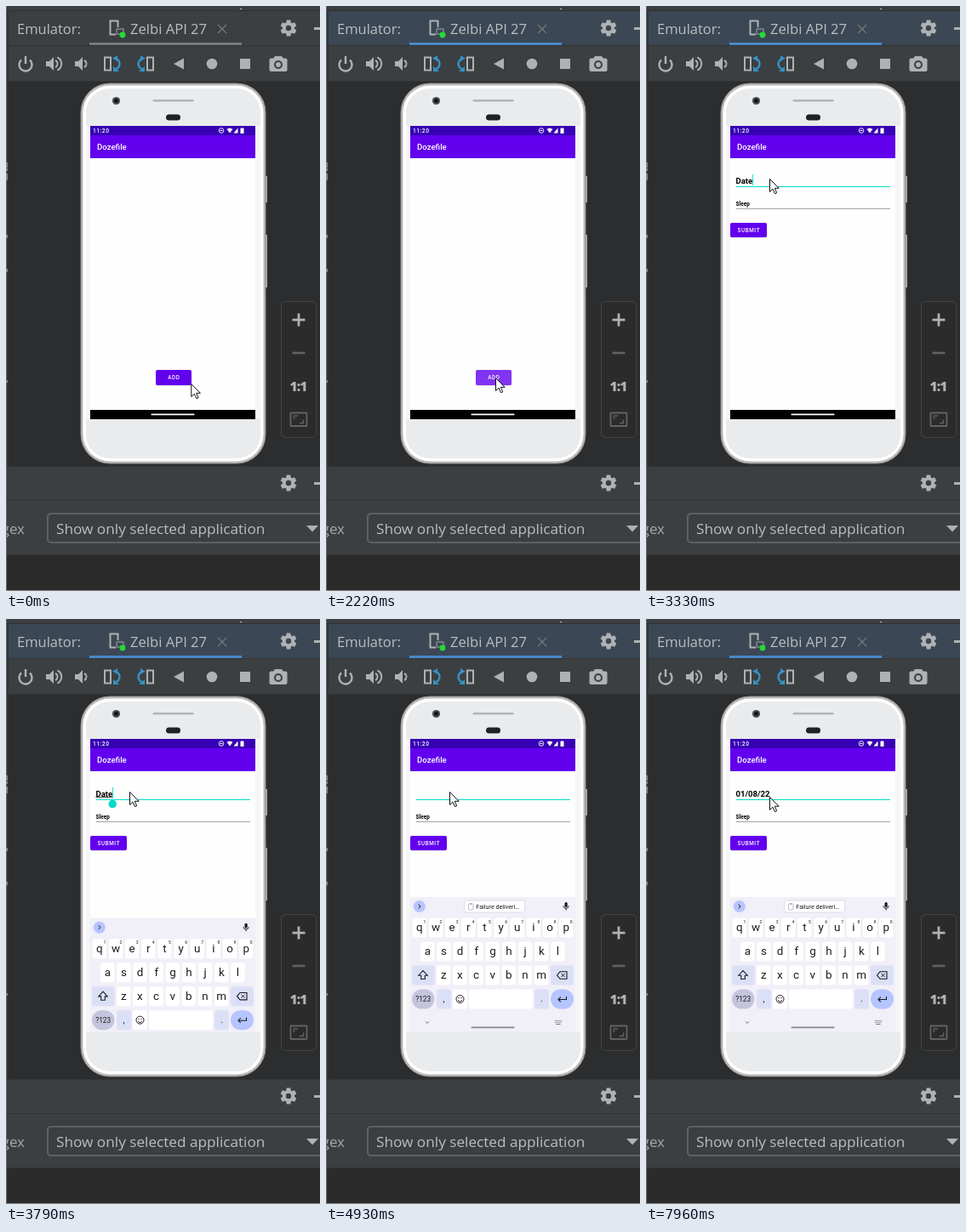
Write an HTML page with a canvas that moves like this. It is 369 px wide and 688 px high and loops after 7990 ms.

```html
<!DOCTYPE html>
<html lang="en">
<head>
<meta charset="utf-8">
<title>Emulator demo</title>
<style>
html, body { margin: 0; width: 100%; height: 100%; overflow: hidden; background: #2b2b2b; }
canvas { display: block; width: 369px; height: 688px; }
</style>
</head>
<body>
<canvas id="stage"></canvas>
<script>
const W = 369, H = 688, LOOP = 7990;
const canvas = document.getElementById('stage');
const c = canvas.getContext('2d');
const dpr = window.devicePixelRatio || 1;
canvas.width = W * dpr;
canvas.height = H * dpr;

const ICON = '#afb1b3', DIM = '#606366', BLUE = '#3592c4';
const PURPLE = '#6200ee', TEAL = '#03dac5', INK = '#1b1b1f';
const UI = '"Open Sans", sans-serif', APP = 'Roboto, sans-serif';

const clamp = v => Math.max(0, Math.min(1, v));
const span = (t, a, b) => clamp((t - a) / (b - a));
const mix = (a, b, p) => a + (b - a) * p;
const smooth = p => p * p * (3 - 2 * p);
const easeOut = p => 1 - (1 - p) ** 3;

function rect(x, y, w, h, color) {
  c.fillStyle = color;
  c.fillRect(x, y, w, h);
}
function rounded(x, y, w, h, r, fill, stroke, width = 1) {
  c.beginPath();
  c.roundRect(x, y, w, h, r);
  if (fill) { c.fillStyle = fill; c.fill(); }
  if (stroke) { c.strokeStyle = stroke; c.lineWidth = width; c.stroke(); }
}
function disc(x, y, r, fill) {
  c.beginPath();
  c.arc(x, y, r, 0, Math.PI * 2);
  c.fillStyle = fill;
  c.fill();
}
function arc(x, y, r, a, b, color, width) {
  c.beginPath();
  c.arc(x, y, r, a, b);
  c.strokeStyle = color;
  c.lineWidth = width;
  c.stroke();
}
function trace(points, closed) {
  c.beginPath();
  for (let i = 0; i < points.length; i += 2) c.lineTo(points[i], points[i + 1]);
  if (closed) c.closePath();
}
function poly(points, fill) {
  trace(points, true);
  c.fillStyle = fill;
  c.fill();
}
function line(points, color, width = 1, closed = false) {
  trace(points, closed);
  c.strokeStyle = color;
  c.lineWidth = width;
  c.stroke();
}
function text(s, x, y, font, color, align = 'left', spacing = 0) {
  c.font = font;
  c.fillStyle = color;
  c.textAlign = align;
  c.letterSpacing = spacing + 'px';
  c.fillText(s, x, y);
  c.letterSpacing = '0px';
}
function at(x, y, draw) {
  c.save();
  c.translate(x, y);
  draw();
  c.restore();
}

// IDE window

function gear(x, y) {
  at(x, y, () => {
    for (let i = 0; i < 6; i++) {
      c.rotate(Math.PI / 3);
      poly([-2.2, -9.5, 2.2, -9.5, 3.2, -5, -3.2, -5], ICON);
    }
    arc(0, 0, 5.1, 0, 7, ICON, 3.8);
  });
  rect(362, y - 1, 7, 3, ICON);
}
function speaker(x, waves) {
  poly([x, 65, x + 4, 65, x + 9, 60, x + 9, 76, x + 4, 71, x, 71], ICON);
  arc(x + 9, 68, 4.5, -1.1, 1.1, ICON, 2);
  if (waves > 1) arc(x + 10, 68, 8.3, -1.15, 1.15, ICON, 2);
}
function rotateIcon(x, dir) {
  at(x, 68, () => {
    c.scale(dir, 1);
    line([-9, -7.5, -2, -7.5, -2, 7.5, -9, 7.5], ICON, 2, true);
    arc(2, 0, 6.5, -1.3, 1.25, BLUE, 2.4);
    poly([0, -6.5, 6, -10, 6, -3], BLUE);
    poly([1, 3, 8, 9, 1, 9], BLUE);
  });
}
function toolbar() {
  arc(23, 69, 7.5, -0.85, Math.PI + 0.85, ICON, 2.4);
  rect(21.8, 59, 2.4, 9, ICON);
  speaker(47, 2);
  speaker(81, 1);
  rotateIcon(125, 1);
  rotateIcon(164, -1);
  poly([197, 68, 209, 61.5, 209, 74.5], ICON);
  disc(242, 68, 6.3, ICON);
  rect(275, 62, 12, 12, ICON);
  rounded(309.5, 61.5, 21, 15.5, 2, ICON);
  poly([314, 62, 316, 59, 324, 59, 326, 62], ICON);
  disc(320, 69, 5, '#3c3f41');
  disc(320, 69, 3, ICON);
}
function zoomPanel() {
  rounded(323.5, 347.5, 41, 160, 5, '#2b2b2b', '#434648');
  rect(336.5, 367.7, 15, 2.8, ICON);
  rect(342.6, 361.6, 2.8, 15, ICON);
  rect(336.5, 406.7, 15, 2.6, DIM);
  text('1:1', 343.5, 452.6, '800 15.4px ' + UI, ICON, 'center', -0.8);
  rounded(334.5, 478.5, 19, 15.5, 0.5, null, DIM, 1.8);
  line([338.5, 486, 338.5, 482, 343, 482], DIM, 1.4);
  line([349.5, 486.5, 349.5, 490.5, 345, 490.5], DIM, 1.4);
}
function ide(active) {
  rect(0, 0, W, H, '#2b2d2e');
  rect(0, 0, W, 88, '#3c3f41');
  rect(0, 5, W, 1, '#2f3133');
  rect(275, 3, 2, 1, '#c8c8c8');
  rect(3, 6, W, 40, active ? '#3b4754' : '#3c3f41');
  rect(3, 46, W, 1, '#323436');
  rect(0, 88, W, 1, '#323436');
  rect(1, 6, 2, 535, '#313335');

  text('Emulator:', 13, 33, '16.5px ' + UI, '#bbbdbf');
  line([132, 17.5, 122.5, 17.5, 122.5, 33.5, 129, 33.5], ICON, 2);
  line([131.5, 17, 131.5, 25], ICON, 2);
  rounded(130, 27, 8, 6, 0.5, null, '#7f8b93', 1.5);
  disc(137, 34, 3.4, '#22dd32');
  text('Zelbi API 27', 146, 33, '16.6px ' + UI, '#bbbdbf');
  line([249, 22, 259, 32], '#73787b', 1.3);
  line([259, 22, 249, 32], '#73787b', 1.3);
  rect(98, 43, 179, 3, active ? '#4a88c7' : '#747a80');
  gear(332, 26);
  toolbar();
  zoomPanel();

  rect(0, 541, W, 104, '#3c3f41');
  rect(0, 541, W, 1, '#323436');
  rect(0, 581, W, 1, '#323436');
  rect(0, 645, W, 1, '#323436');
  rect(0, 646, W, 42, '#2b2b2b');
  gear(332, 561);
  text('gex', 22, 621, '17px ' + UI, '#a6a9ab', 'right');
  rounded(49, 597, 340, 34, 4, '#3c3f41', '#5e6164', 2);
  text('Show only selected application', 59, 621, '17.2px ' + UI, '#bbbdbf');
  poly([353, 611, 367, 611, 360, 618.5], ICON);

  rect(0, 0, 1, H, '#66686a');
  rect(0, H - 1, W, 1, '#85878a');
  [[184, 6], [191, 3], [197, 8], [269, 4], [309, 4], [440, 3]]
    .forEach(([y, h]) => rect(0, y, 2, h, '#85888a'));
}

// Phone

function phoneBody() {
  rect(303, 200, 4, 31, '#aeb0b2');
  rect(303, 269, 4, 62, '#aeb0b2');
  rounded(88, 91, 217, 447, 34, '#bdbabb', '#8f8d8e', 1);
  rounded(90.5, 93.5, 212, 442, 31.5, '#fff');
  rounded(94, 97, 205, 435, 28, '#e9ebed');
  rect(94, 141, 5, 345, '#f5f6f7');
  rect(293, 141, 6, 345, '#f5f6f7');
  disc(129.5, 111.5, 4.6, '#4a4c4e');
  disc(129.5, 111.5, 2.4, '#111315');
  rounded(172.5, 110, 48, 2.5, 1.2, '#b2b4b6');
  rounded(188, 127.5, 17, 7, 3.5, '#202224');
}
function statusBar() {
  rect(99, 141, 194, 11, '#3700b3');
  text('11:20', 102, 149.3, '500 6.7px ' + APP, '#fff', 'left', 0.5);
  arc(253, 146.5, 2.8, 0, 7, '#fff', 0.9);
  rect(251.5, 146, 3, 1, '#fff');
  poly([259.5, 144.8, 263, 143.5, 266.5, 144.8, 263, 149.5], '#fff');
  poly([267.5, 149.5, 272.5, 149.5, 272.5, 143.5], '#fff');
  rounded(275.5, 143.5, 4, 6.5, 0.6, '#fff');
}
function button(label, x, y, w, h) {
  rounded(x, y + 0.5, w, h, 2, 'rgba(0,0,0,.2)');
  rounded(x, y, w, h, 2, PURPLE);
  text(label, x + w / 2 + 0.3, y + h / 2 + 2.2, '500 6.3px ' + APP, '#fff', 'center', 0.6);
}
function title() {
  text('Dozefile', 107, 169, '500 9.6px ' + APP, '#fff');
}
function home(t) {
  title();
  button('ADD', 176, 428, 42, 18);
  const p = span(t, 1800, 1950);
  if (p > 0) {
    c.save();
    c.beginPath();
    c.roundRect(176, 428, 42, 18, 2);
    c.clip();
    disc(199, 437, mix(4, 28, p), 'rgba(255,255,255,.2)');
    c.restore();
  }
}

const EDITS = [[4010, 'Dat'], [4160, 'Da'], [4310, 'D'], [4460, ''], [5030, '0'], [5090, '01'],
  [5300, '01/'], [5510, '01/0'], [6310, '01/08'], [6520, '01/08/'], [7080, '01/08/2'], [7230, '01/08/22']];
const CARET_OFF = [[0, 3330], [4930, 5030], [6030, 6310], [7750, LOOP]];

function form(t) {
  title();
  const value = EDITS.reduce((s, [start, next]) => t >= start ? next : s, 'Date');
  text(value, 105.4, 208.6, 'bold 9.6px ' + APP, '#000');
  const end = 105.4 + c.measureText(value).width;
  rect(106, 212, 181, 1, '#5c5c60');
  const focus = span(t, 3030, 3150);
  if (focus) rect(mix(146, 106, focus), 212, 181 * focus, 1, TEAL);
  if (t >= 3510 && t < 4460) rect(105.4, 209.4, end - 105.4, 0.8, '#000');
  if (!CARET_OFF.some(([a, b]) => t >= a && t < b)) rect(end, 198, 0.9, 13, TEAL);
  if (t >= 3480 && t < 4010) {
    disc(125.2, 217.6, 4.7, TEAL);
    poly([125.2, 211.8, 128.6, 214.5, 121.8, 214.5], TEAL);
  }
  text('Sleep', 105.6, 235, 'bold 6.4px ' + APP, '#000');
  rect(106, 238, 181, 1, '#a3a3a6');
  button('SUBMIT', 99, 255, 43, 17);
}

// Keyboard

function keyRow(letters, x, y, hints) {
  [...letters].forEach((ch, i) => {
    const mid = x + i * 19.15;
    rounded(mid - 8.2, y - 11.5, 16.4, 23, 3, '#fff');
    text(ch, mid, y + 4.3, '13.4px ' + APP, INK, 'center');
    if (hints) text((i + 1) % 10, mid + 6, y - 5.5, '500 5px ' + APP, '#45464c', 'center');
  });
}
function keyboard(t) {
  const tint = '#dce0f7', accent = '#b6c4ff';
  rect(99, 327, 194, 160, '#f1eff7');
  disc(109.8, 338, 7, accent);
  line([108.6, 335.6, 111, 338, 108.6, 340.4], INK, 1);
  rounded(280.5, 333, 3.2, 6, 1.6, INK);
  arc(282.1, 337.3, 3.1, 0, Math.PI, INK, 0.9);
  rect(281.6, 340.5, 1, 2, INK);

  const chip = span(t, 4040, 4130);
  if (chip) {
    c.save();
    c.globalAlpha = chip;
    rounded(162.5, 331, 71, 14, 3, '#fff', '#d5d5de', 0.8);
    rounded(167.5, 335, 5.5, 7, 0.8, null, '#b4b5c4', 0.9);
    rect(169, 334, 2.5, 2, '#b4b5c4');
    text('Failure deliveri…', 176.3, 340.6, '7.2px ' + APP, INK);
    c.restore();
  }

  keyRow('qwertyuiop', 109.8, 363, true);
  keyRow('asdfghjkl', 119.3, 391);
  keyRow('zxcvbnm', 138.2, 419);
  rounded(101, 407.5, 26.5, 23, 3, tint);
  line([114, 413.5, 108.8, 419.2, 111.7, 419.2, 111.7, 423.5, 116.3, 423.5, 116.3, 419.2, 119.2, 419.2], INK, 1.1, true);
  rounded(264, 407.5, 27, 23, 3, tint);
  line([271.5, 419, 275, 414.8, 283, 414.8, 283, 423.2, 275, 423.2], INK, 1.1, true);
  line([276.5, 417, 280.5, 421], INK, 1);
  line([280.5, 417, 276.5, 421], INK, 1);

  rounded(101, 435.5, 26.5, 23, 11.5, '#c4c5dc');
  text('?123', 114.2, 450, '8.3px ' + APP, INK, 'center');
  rounded(130, 435.5, 17, 23, 3, tint);
  text(',', 138.5, 450, '10px ' + APP, INK, 'center');
  rounded(149, 435.5, 17, 23, 3, '#fff');
  arc(157.5, 447, 4.5, 0, 7, INK, 1);
  arc(157.5, 447.6, 2.3, 0.2, Math.PI - 0.2, INK, 0.9);
  disc(156, 445.7, 0.7, INK);
  disc(159, 445.7, 0.7, INK);
  rounded(168, 435.5, 75, 23, 3, '#fff');
  rounded(245, 435.5, 17, 23, 3, tint);
  text('.', 253.5, 450, '10px ' + APP, INK, 'center');
  rounded(264, 435.5, 27, 23, 11.5, accent);
  line([282.5, 444, 282.5, 447.5, 273, 447.5], INK, 1.1);
  line([275.8, 444.7, 273, 447.5, 275.8, 450.3], INK, 1.1);

  line([117, 473.4, 119, 475.4, 121, 473.4], '#55565c', 0.9);
  for (let i = 0; i < 8; i++) rect(269 + i % 4 * 2.2, 472 + (i >> 2) * 2, 1.2, 1, '#66676d');
  rect(270.5, 476, 5, 0.9, '#66676d');
}
function screen(t) {
  c.save();
  c.beginPath();
  c.rect(99, 141, 194, 345);
  c.clip();
  rect(99, 152, 194, 334, '#fefefe');
  rect(99, 152, 194, 27, PURPLE);
  const shift = easeOut(span(t, 2290, 2600));
  const alpha = span(t, 2320, 2410);
  if (alpha < 1) {
    c.globalAlpha = 1 - alpha;
    at(-19 * shift, 0, () => home(t));
  }
  if (alpha > 0) {
    c.globalAlpha = alpha;
    at(19 * (1 - shift), 0, () => form(t));
  }
  c.globalAlpha = 1;
  statusBar();
  rect(99, 475, 194, 11, '#000');
  const rise = 1 - (1 - span(t, 3690, 3940)) ** 3.6;
  if (t >= 3720) at(0, 159 * (1 - rise), () => keyboard(t));
  if (t < 3720) rounded(170.5, 479.5, 51, 1.8, 0.9, '#fff');
  else if (t >= 3940) rounded(170.5, 479.5, 51, 1.8, 0.9, '#85858b');
  c.restore();
}

// Mouse: start, end, destination, easing

const MOVES = [
  [650, 860, 202.5, 440, smooth],
  [1460, 1800, 199.5, 437, smooth],
  [2260, 2610, 232.5, 251, smooth],
  [2610, 2990, 145.5, 203, easeOut],
  [7900, 7960, 145.5, 209, smooth]
];
function pointer(t) {
  let x = 217.8, y = 444;
  for (const [a, b, toX, toY, ease] of MOVES) {
    const p = ease(span(t, a, b));
    x = mix(x, toX, p);
    y = mix(y, toY, p);
  }
  at(x, y, () => {
    c.lineJoin = 'round';
    const shape = [0, 0.5, 0, 15.5, 3.5, 12.2, 6, 17.7, 8.2, 16.8, 5.8, 11.3, 10.6, 11.3];
    poly(shape, '#fff');
    line(shape, '#111', 1, true);
  });
}

function frame(now) {
  const t = now % LOOP;
  c.setTransform(dpr, 0, 0, dpr, 0, 0);
  ide(t >= 1800);
  phoneBody();
  screen(t);
  pointer(t);
}
const start = performance.now();
function tick() {
  frame(performance.now() - start);
  requestAnimationFrame(tick);
}
tick();
</script>
</body>
</html>
```
